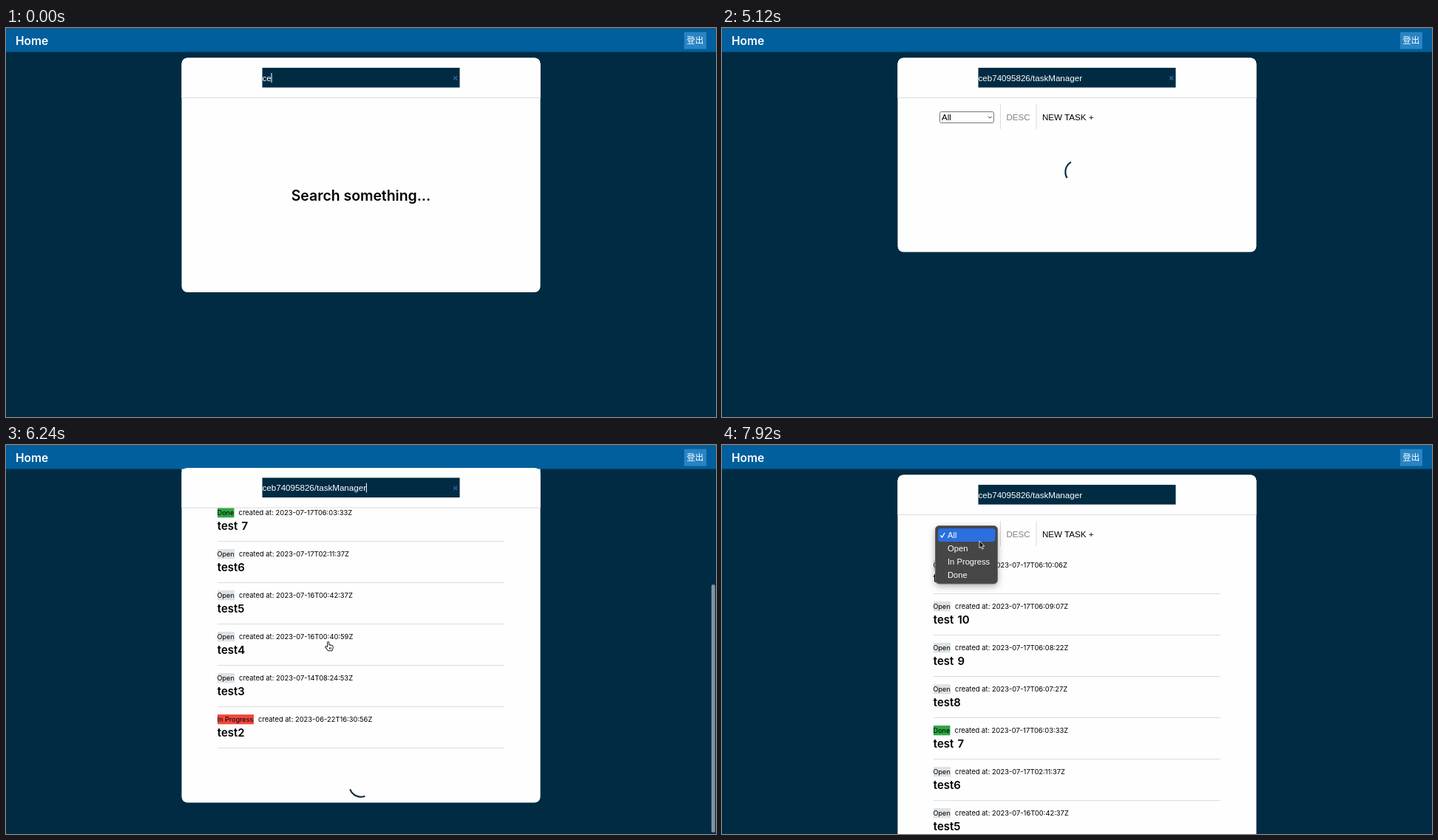
Write an HTML page that moves like this. It is 960x527 px and loops after 8000 ms.

```html
<!DOCTYPE html>
<html lang="en">
<head>
<meta charset="utf-8">
<title>Task search</title>
<style>
  html, body { margin: 0; width: 100%; height: 100%; overflow: hidden; background: #002b43; }
  svg { display: block; width: 100vw; height: 100vh; }
  text { white-space: pre; }
  .ui { font: 400 11.6px "Liberation Sans", Arial, sans-serif; }
  .menu { font: 400 11.2px "Liberation Sans", Arial, sans-serif; fill: #fff; }
  .small { font: 400 9.35px Inter, sans-serif; }
  .badge { font: 400 9.1px Inter, sans-serif; }
  .title { font: 600 15px Inter, sans-serif; word-spacing: 1.4px; }
  .brand { font: 600 15.5px Inter, sans-serif; fill: #fff; }
  .prompt { font: 600 19.4px Inter, sans-serif; text-anchor: middle; }
  .logout { font: 500 11.5px "Noto Sans CJK TC", "Noto Sans CJK", sans-serif; fill: #fff; }
  .line { stroke: #dcdcdc; stroke-width: 1; fill: none; }
</style>
</head>
<body>
<svg viewBox="0 0 960 527">
  <rect width="960" height="527" fill="#002b43"/>

  <g id="page">
    <rect id="card" x="237.5" y="40.5" width="485" rx="8" fill="#fefefe"/>
    <text id="prompt" class="prompt" x="480" y="234">Search something...</text>
    <g id="toolbar">
      <rect x="294.5" y="113.5" width="73" height="15" rx="2" fill="#fff" stroke="#767676"/>
      <text class="ui" x="297" y="125">All</text>
      <path d="M360 119.8l2.3 2.3 2.3-2.3" fill="none" stroke="#222"/>
      <path class="line" d="M376.5 103V137M425 103V137"/>
      <text class="ui" x="384.5" y="125" fill="#808080">DESC</text>
      <text class="ui" x="433" y="125">NEW TASK +</text>
    </g>
    <g id="list"></g>
    <circle id="spinner" r="15.7" fill="none" stroke="#002b43" stroke-width="2.1"
            pathLength="4" stroke-dasharray="1 3"/>
  </g>

  <g>
    <rect width="960" height="32.5" fill="#005f9c"/>
    <rect width="960" height="1" fill="#2a5573"/>
    <text class="brand" x="13" y="22.5">Home</text>
    <rect x="917" y="5.5" width="30" height="23" fill="#2a84c4"/>
    <text class="logout" x="920.3" y="21.3">登出</text>
  </g>

  <g id="head">
    <path d="M237.5 54V8a8 8 0 0 1 8-8h469a8 8 0 0 1 8 8v46z" fill="#fefefe"/>
    <path class="line" d="M237.5 54H722.5"/>
    <rect x="346.5" y="13.4" width="267" height="26.7" fill="#002b43"/>
    <text id="query" class="ui" x="346.5" y="31" fill="#fff"></text>
    <rect id="caret" y="20.5" width="1" height="13" fill="#fff"/>
    <path id="clear" d="M605 24.7l5.2 5.2M610.2 24.7l-5.2 5.2" stroke="#2b5c9e" stroke-width="1.5"/>
  </g>

  <g id="menu" style="filter:drop-shadow(0 3px 5px rgba(0,0,0,.3))">
    <rect x="288.5" y="109.5" width="84" height="78.5" rx="5" fill="#464646" stroke="#6a6a6a"/>
    <rect x="292" y="113" width="77.5" height="18" rx="3.5" fill="#2b6fe0"/>
    <path d="M295.5 122.5l2 2.5 3.7-6" fill="none" stroke="#fff" stroke-width="1.3"/>
  </g>

  <rect id="thumb" x="953.8" width="5" rx="2.5" fill="#fff" fill-opacity=".5"/>

  <g id="pointer" stroke-linejoin="round">
    <path id="hand" fill="#fff" stroke="#222" stroke-width=".9" transform="scale(1.12)"
          d="M-2.2 1V-4.3a1 1 0 0 1 2 0V-1.4q1-.7 1.7.3q1-.5 1.6.5q1.5-.3 1.5 1.2V2.6L3.4 5.6H-1.2L-4.6 1.4q-.2-1.6 1.2-1.1zM.4 1.4V3.8M2 1.4V3.8"/>
    <path id="arrow" fill="#111" stroke="#fff" stroke-width=".8"
          d="M-2-5V4.6L.2 2.6L1.8 6L3.4 5.3L1.9 2H4.9z"/>
  </g>
</svg>

<script>
const LOOP = 8000, STEP = 80;
const VIEW = 527, TOP = 40.5, BAR = 32.5, ROW = 56, FIRST_LINE = 201.5;
const SUBMIT = 4720, LOADED = 5440, MORE = 5680, COMPLETE = 6320, MENU = 7680;

const QUERY = "ceb74095826/taskManager";
// Moments at which the third and later characters are typed.
const KEYS = [160, 400, 720, 880, 1040, 1200, 1360, 1520, 1680, 2000, 2400, 2480,
  2560, 2720, 3120, 3360, 3600, 4000, 4160, 4320, 4480];
const BLINK_OFF = [[4960, 6080], [6560, 6960], [7440, LOOP]];

const SCROLL = [[5520, 0], [5600, 18], [5680, 95], [5760, 200], [5840, 285], [5920, 317],
  [6000, 309], [6160, 297], [6320, 293], [6480, 295], [6640, 295], [6720, 262],
  [6800, 165], [6880, 58], [6960, -9], [7040, -4.5], [7120, -2], [7280, 0]];
const POINTER_X = [[6720, 437], [7040, 362], [7360, 338], [7680, 338], [7920, 350]];
const POINTER_Y = [[6720, 272.5], [7040, 174], [7360, 122], [7680, 122], [7920, 135]];
const THUMB_FADE = [[5520, 0], [5600, 1], [7360, 1], [7600, 0]];

const STATUS = {
  Open: { color: "#dde2e6", width: 23, next: 315.5 },
  Done: { color: "#2fa744", width: 22.5, next: 315 },
  "In Progress": { color: "#f0483e", width: 49, next: 341.5 },
};
const TASKS = [
  ["test11", "07-17T06:10:06"], ["test 10", "07-17T06:09:07"], ["test 9", "07-17T06:08:22"],
  ["test8", "07-17T06:07:27"], ["test 7", "07-17T06:03:33", "Done"], ["test6", "07-17T02:11:37"],
  ["test5", "07-16T00:42:37"], ["test4", "07-16T00:40:59"], ["test3", "07-14T08:24:53"],
  ["test2", "06-22T16:30:56", "In Progress"], ["test 1", "06-21T11:16:25", "Done"],
];

const $ = id => document.getElementById(id);

function add(parent, tag, attrs, text = "") {
  const node = document.createElementNS(parent.namespaceURI, tag);
  for (const name in attrs) node.setAttribute(name, attrs[name]);
  node.textContent = text;
  return parent.appendChild(node);
}

function show(id, visible) {
  $(id).style.display = visible ? "" : "none";
}

function move(id, x, y) {
  $(id).setAttribute("transform", `translate(${x} ${y})`);
}

function track(keys, t) {
  const i = keys.findIndex(key => key[0] > t);
  if (i === 0) return keys[0][1];
  if (i < 0) return keys[keys.length - 1][1];
  const [t0, a] = keys[i - 1], [t1, b] = keys[i];
  return a + (b - a) * (t - t0) / (t1 - t0);
}

const rows = TASKS.map(([title, date, status = "Open"], i) => {
  const { color, width, next } = STATUS[status];
  const row = add($("list"), "g", { transform: `translate(0 ${FIRST_LINE + i * ROW})` });
  add(row, "rect", { x: 286, y: -45.4, width, height: 13.2, fill: color });
  add(row, "text", { class: "badge", x: 285.6, y: -35.6 }, status);
  add(row, "text", { class: "small", x: next - .4, y: -35.6 }, `created at: 2023-${date}Z`);
  add(row, "text", { class: "title", x: 285.8, y: -15.1 }, title);
  add(row, "path", { class: "line", d: "M286 0H674" });
  return row;
});

["All", "Open", "In Progress", "Done"].forEach((label, i) =>
  add($("menu"), "text", { class: "menu", x: 305, y: 126 + 18 * i }, label));

function cardBottom(t) {
  if (t < SUBMIT) return 358;
  if (t < LOADED) return 303.5;
  return t < COMPLETE ? 779.5 : 788.5;
}

function drawQuery(t) {
  $("query").textContent = QUERY.slice(0, 2 + KEYS.filter(key => key <= t).length);
  $("caret").setAttribute("x", 346.3 + $("query").getComputedTextLength());
  show("caret", !BLINK_OFF.some(([from, to]) => t >= from && t < to));
  show("clear", t < MENU);
}

function drawSpinner(t) {
  const first = t >= SUBMIT && t < LOADED;
  const second = t >= MORE && t < COMPLETE;
  show("spinner", first || second);
  const middle = first ? 194 + (t - 5120) * .36 : (t - 5920) * .36;
  $("spinner").setAttribute("transform",
    `translate(480 ${first ? 195 : 756}) rotate(${middle - 45})`);
}

function drawScroll(t, bottom) {
  const pageHeight = bottom + 41;
  const limit = Math.max(0, pageHeight - VIEW);
  const scroll = track(SCROLL, t);
  const settled = Math.min(Math.max(scroll, 0), limit);
  move("page", 0, -scroll);
  move("head", 0, Math.max(TOP - settled, BAR) - (scroll - settled));

  const fade = track(THUMB_FADE, t);
  show("thumb", fade > 0);
  if (!fade) return;
  const length = (VIEW - 4) * VIEW / pageHeight;
  const thumb = $("thumb");
  thumb.setAttribute("height", length);
  thumb.setAttribute("y", 2 + (VIEW - 4 - length) * settled / limit);
  thumb.setAttribute("opacity", fade);
}

function draw(t) {
  const bottom = cardBottom(t);
  $("card").setAttribute("height", bottom - TOP);
  show("prompt", t < SUBMIT);
  show("toolbar", t >= SUBMIT);
  show("list", t >= LOADED);
  rows[rows.length - 1].style.display = t < COMPLETE ? "none" : "";
  show("menu", t >= MENU);
  drawQuery(t);
  drawSpinner(t);
  drawScroll(t, bottom);
  show("pointer", t >= 5600);
  show("hand", t < 7200);
  show("arrow", t >= 7200);
  move("pointer", track(POINTER_X, t), track(POINTER_Y, t));
}

const start = performance.now();
function tick() {
  const t = (performance.now() - start) % LOOP;
  draw(Math.floor(t / STEP) * STEP);
  requestAnimationFrame(tick);
}
tick();
</script>
</body>
</html>
```
